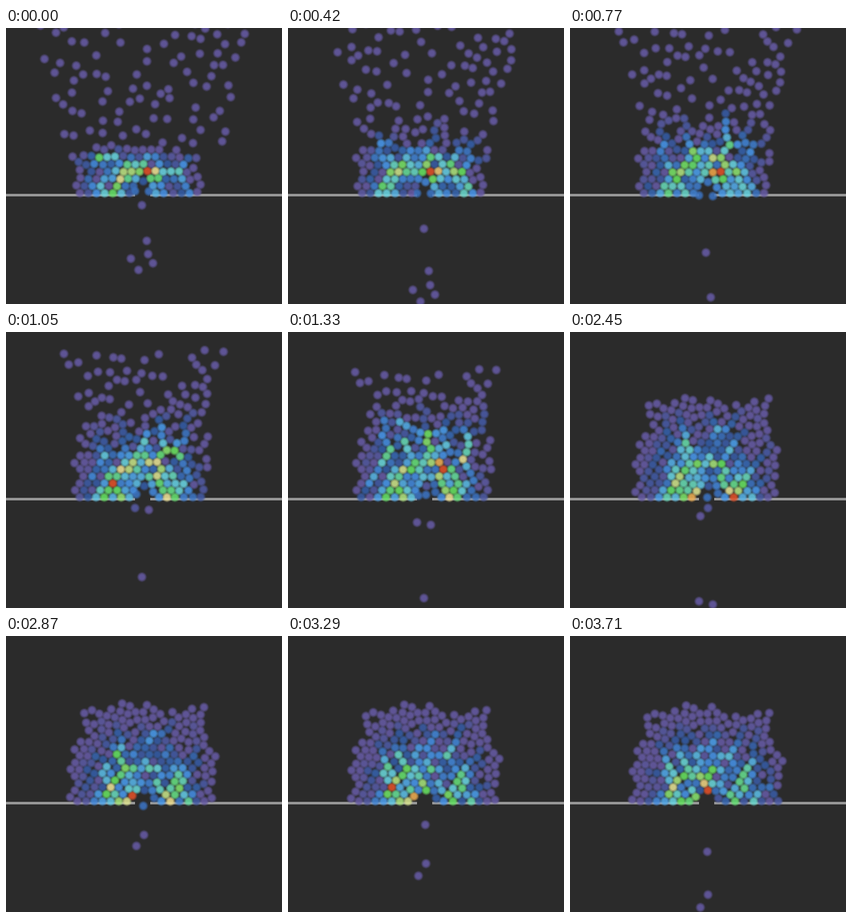
A matplotlib script that plays this animation: 400 px wide and 398 px high, repeating every 3780 ms.

```python
import numpy as np
import matplotlib.pyplot as plt
from matplotlib.animation import FuncAnimation

W, H, FRAMES, INTERVAL = 400, 398, 54, 70
WALL_Y, FLOOR = 241, 238
DOOR = (187, 209)
GOAL = np.array([198, 258])
ARCH, ARCH_R = np.array([198, 240]), 18
SPEED, RELAX = 7.4, 7.0
STIFF, DAMP_N, DAMP_T, DAMP_WALL = 80, 4, 3, 4
SUBSTEPS = 40
WALKERS, GAP = 116, 12.5
RADIUS = (5.6, 6.0)

# From no pressure to the highest, and the share of the crowd below each
PALETTE = np.array([(102, 90, 164), (52, 92, 165), (72, 150, 235), (105, 212, 225),
                    (100, 225, 95), (235, 225, 150), (240, 140, 40), (225, 80, 40)]) / 255
RANKS = np.array([0.2, 0.45, 0.66, 0.81, 0.93, 0.988, 0.996, 1])

# Those who get through: frame of leaving and x
EXITS = np.array([(-20.4, 192), (-19.1, 213), (-18.2, 181), (-17.3, 206), (-14.6, 204),
                  (-6, 197), (8.8, 207), (9.4, 187), (27, 189), (29.4, 200), (37.8, 199)])

rng = np.random.default_rng(12)


def length(v):
    return np.hypot(v[:, 0], v[:, 1])[:, None]


def heading(pos):
    d = GOAL - pos
    return d / length(d)


def make_crowd():
    """Jittered rows already waiting at the door."""
    row, col = np.mgrid[0:7, 0:15]
    x = 188 + (col - 7.25 + 0.5 * (row % 2)) * (11.9 + 0.7 * row)
    pts = np.c_[x.ravel(), (236 - 11.3 * row).ravel()]
    pts += rng.uniform(-1.5, 1.5, pts.shape)
    return pts[length(pts - ARCH)[:, 0] > ARCH_R - 2]


def scatter_walkers(crowd):
    """Evenly spread walkers in a fan that narrows towards the door."""
    pts = list(crowd)
    while len(pts) < len(crowd) + WALKERS:
        y = rng.uniform(-82, 170)
        p = np.array([198 + rng.uniform(-1, 1) * (154 - 0.22 * y), y])
        if length(np.array(pts) - p).min() > GAP:
            pts.append(p)
    return np.array(pts[len(crowd):])


def nearby_pairs(pos):
    i, j = np.triu_indices(len(pos), 1)
    near = ((pos[i] - pos[j]) ** 2).sum(1) < 28 ** 2
    return i[near], j[near]


def advance(pos, vel, rad):
    """Move the crowd by one frame; return the mean contact load."""
    n, dt = len(pos), 1 / SUBSTEPS
    i, j = nearby_pairs(pos)
    reach = (rad[i] + rad[j])[:, None]
    total = np.zeros(n)
    for _ in range(SUBSTEPS):
        acc = (SPEED * heading(pos) - vel) / RELAX

        d = pos[j] - pos[i]
        dist = length(d)
        normal = d / dist
        overlap = np.clip(reach - dist, 0, 3)
        touch = overlap > 0
        rel = vel[j] - vel[i]
        vn = (rel * normal).sum(1, keepdims=True)
        push = np.maximum(STIFF * overlap - DAMP_N * vn * touch, 0)
        force = DAMP_T * (rel - vn * normal) * touch - push * normal
        for k in (0, 1):
            acc[:, k] += np.bincount(i, force[:, k], n) - np.bincount(j, force[:, k], n)
        load = STIFF * overlap[:, 0]
        total += np.bincount(i, load, n) + np.bincount(j, load, n)

        d = pos - ARCH
        dist = length(d)
        overlap = np.clip(ARCH_R - dist, 0, 3)
        acc += STIFF * overlap * d / dist - DAMP_WALL * vel * (overlap > 0)
        total += STIFF * overlap[:, 0]

        overlap = np.clip(pos[:, 1] - FLOOR, 0, 3)
        acc -= DAMP_WALL * vel * (overlap > 0)[:, None]
        acc[:, 1] -= STIFF * overlap
        total += STIFF * overlap

        vel += acc * dt
        pos += vel * dt
    return total / SUBSTEPS


def simulate():
    crowd = make_crowd()
    vel = np.zeros_like(crowd)
    rad = rng.uniform(*RADIUS, len(crowd))
    for _ in range(10):
        load = advance(crowd, vel, rad)

    walkers = scatter_walkers(crowd)
    pos = np.vstack([crowd, walkers])
    vel = np.vstack([vel, SPEED * heading(walkers)])
    rad = np.r_[rad, rng.uniform(*RADIUS, len(walkers))]
    load = np.r_[load, np.zeros(len(walkers))]

    places, loads = [], []
    for _ in range(FRAMES):
        places.append(pos.copy())
        loads.append(load)
        load = 0.4 * load + 0.6 * advance(pos, vel, rad)
    return places, loads


def pressure_level(frame):
    """Palette position of each load; the crowd cools as it settles."""
    load = loads[frame]
    ranks = RANKS ** np.interp(frame, [20, 40], [1, 0.62])
    return np.interp(load, np.quantile(load[load > 0.5], ranks), np.arange(len(RANKS)))


def leavers(frame):
    birth, x = EXITS.T
    s = frame - birth
    t = np.maximum(s, 0)
    y = 240 + 7.9 * (t - 7 * (1 - np.exp(-t / 7))) + 0.5 * np.minimum(s, 0)
    level = np.interp(y, [246, 256], [1.4, 0])
    y[s < -14] = -50
    return np.c_[x, y], level


def colours(level):
    steps = np.arange(len(PALETTE))
    return np.c_[tuple(np.interp(level, steps, PALETTE[:, c]) for c in range(3))]


places, loads = simulate()

fig = plt.figure(figsize=(W / 100, H / 100), dpi=100, facecolor="#2b2b2b")
ax = fig.add_axes([0, 0, 1, 1])
ax.set(xlim=(0, W), ylim=(H, 0))
ax.axis("off")
for x0, x1 in ((-5, DOOR[0]), (DOOR[1], W + 5)):
    ax.plot([x0, x1], [WALL_Y, WALL_Y], color="#9b9b9b", lw=3.6 * 0.72,
            solid_capstyle="butt", zorder=1)

# Soft-edged discs: radius in pixels and opacity, from the outside in
SOFT = [(7.4, 0.14), (6.4, 0.32), (5.3, 0.5), (3.9, 0.6)]
discs = [ax.scatter([], [], s=(2 * r * 0.72) ** 2, linewidths=0, alpha=a, zorder=2 + k)
         for k, (r, a) in enumerate(SOFT)]


def draw(frame):
    out_pos, out_level = leavers(frame)
    pos = np.vstack([places[frame], out_pos])
    rgb = colours(np.r_[pressure_level(frame), out_level])
    for disc in discs:
        disc.set_offsets(pos)
        disc.set_facecolor(rgb)
    return discs


anim = FuncAnimation(fig, draw, frames=FRAMES, interval=INTERVAL, repeat=True,
                     repeat_delay=0, blit=False)
plt.show()
```
